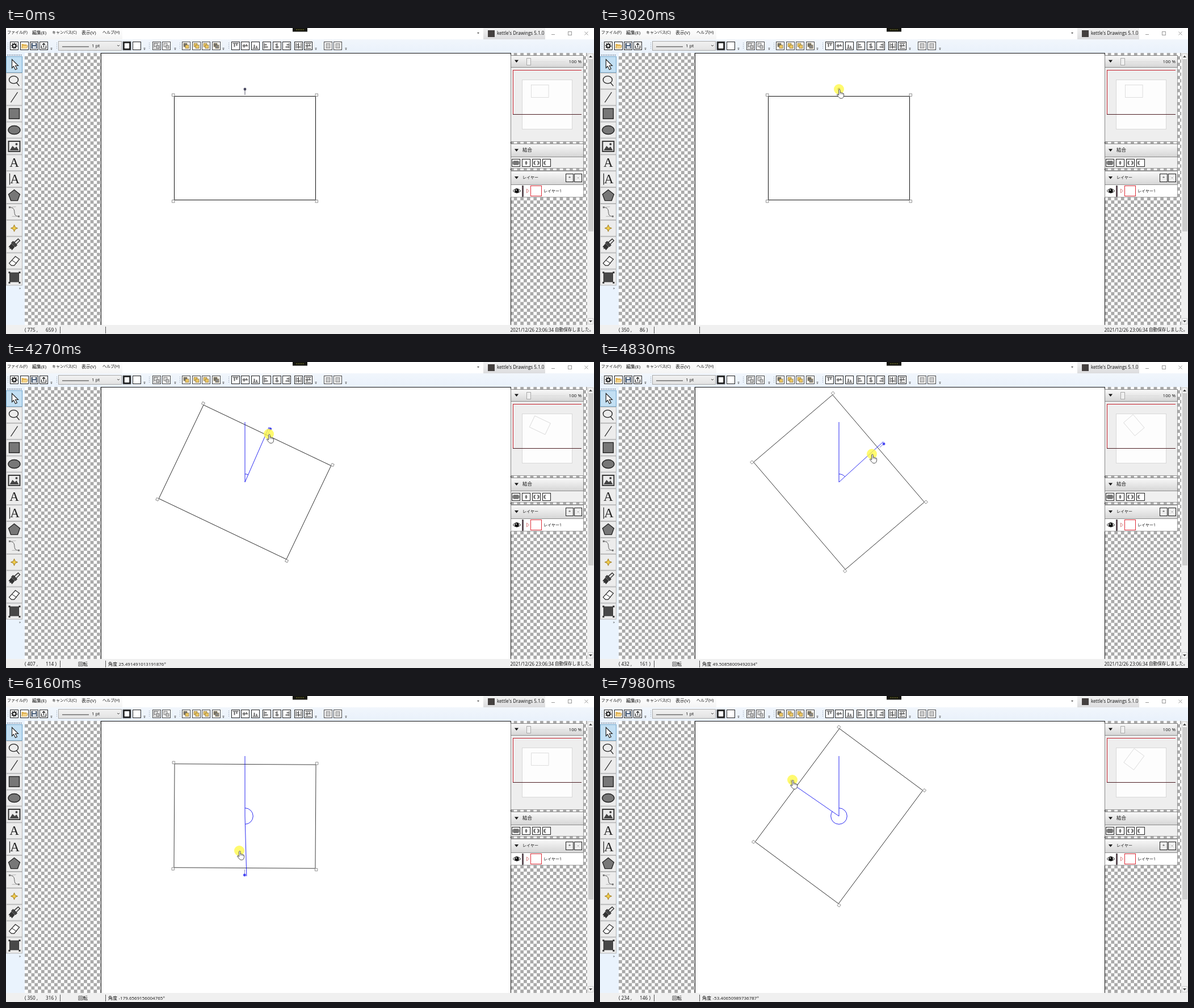
These frames come from a looping animation (1036x540 px, 8000 ms). An HTML page with a canvas:

```html
<!DOCTYPE html>
<html lang="ja">
<head>
<meta charset="utf-8">
<title>Rotate</title>
<style>
html, body { margin: 0; width: 1036px; height: 540px; overflow: hidden; background: #fff; }
canvas { display: block; }
</style>
</head>
<body>
<canvas id="stage" width="1036" height="540"></canvas>
<script>
const W = 1036, H = 540, LOOP = 8000, NOTICE_END = 5040;
const FONT = '"Open Sans", "Noto Sans CJK JP", "Noto Sans CJK", sans-serif';
const stage = document.getElementById('stage').getContext('2d');
const backdrop = document.createElement('canvas');
backdrop.width = W;
backdrop.height = H;
let g = backdrop.getContext('2d');

// Drawing helpers
function fill(x, y, w, h, color) {
  g.fillStyle = color;
  g.fillRect(x, y, w, h);
}
function frame(x, y, w, h, color, width = 1) {
  g.strokeStyle = color;
  g.lineWidth = width;
  g.strokeRect(x, y, w, h);
}
function box(x, y, w, h, color, border, width) {
  fill(x, y, w, h, color);
  frame(x, y, w, h, border, width);
}
function line(x1, y1, x2, y2, color, width = 1) {
  g.strokeStyle = color;
  g.lineWidth = width;
  g.beginPath();
  g.moveTo(x1, y1);
  g.lineTo(x2, y2);
  g.stroke();
}
function shape(d, x, y, color, border, width = 1) {
  const path = new Path2D(d);
  g.save();
  g.translate(x, y);
  if (color) { g.fillStyle = color; g.fill(path); }
  if (border) { g.strokeStyle = border; g.lineWidth = width; g.stroke(path); }
  g.restore();
}
function ellipse(x, y, rx, ry, color, border, width = 1) {
  g.beginPath();
  g.ellipse(x, y, rx, ry, 0, 0, Math.PI * 2);
  if (color) { g.fillStyle = color; g.fill(); }
  if (border) { g.strokeStyle = border; g.lineWidth = width; g.stroke(); }
}
function text(str, x, y, size = 8, color = '#111', align = 'left', family = FONT) {
  g.font = `${size}px ${family}`;
  g.textAlign = align;
  g.textBaseline = 'middle';
  g.fillStyle = color;
  g.fillText(str, x, y);
}
function shade(y, h, top, bottom) {
  const grad = g.createLinearGradient(0, y, 0, y + h);
  grad.addColorStop(0, top);
  grad.addColorStop(1, bottom);
  return grad;
}

function drawCanvasArea() {
  const cell = 5.783;
  fill(33, 44, 991, 480, '#fff');
  g.save();
  g.beginPath();
  g.rect(33, 44, 991, 480);
  g.clip();
  for (let r = 0; r < 84; r++)
    for (let c = (r + 1) % 2; c < 172; c += 2) fill(33 + c * cell, 44 + r * cell, cell, cell, '#a9a9a9');
  box(167.5, 44.5, 722, 500, '#fff', '#111');
  g.restore();
}

function drawTitleBar() {
  fill(0, 0, W, 20, '#fff');
  fill(0, 0, 205, 20, shade(0, 20, '#fff', '#f4f4f4'));
  [['ファイル(F)', 2, 7], ['編集(E)', 46, 8], ['キャンバス(C)', 81, 7], ['表示(V)', 133, 8], ['ヘルプ(H)', 170, 7]]
    .forEach(([label, x, size]) => text(label, x, 8.5, size));
  fill(505, 0, 26, 6.5, '#15150f');
  for (let x = 511; x < 525; x += 3) fill(x, 2.5, 2, 1, '#8a8a35');
  shape('M-2 0H2L0 2Z', 832, 8, '#333');
  fill(841, 0, 109, 20, shade(0, 20, '#f2f2f2', '#dcdcde'));
  fill(849, 4, 12, 12, '#44403f');
  text("kettle's Drawings 5.1.0", 865, 10, 8.05);
  line(961, 11.5, 967, 11.5, '#999');
  frame(990.5, 6.5, 6, 6, '#999');
  shape('M-3-3L3 3M3-3L-3 3', 1022.5, 9.5, null, '#999');
}

function toolBox(x, border = '#222') {
  box(x + .5, 24.5, 14, 14, '#fff', border);
}
function drawToolbar() {
  fill(0, 20, W, 24, shade(20, 24, '#f1f6fc', '#e9f1fb'));
  [3, 89, 252, 306, 392].forEach(x => {
    for (let y = 26; y < 38; y += 3) fill(x, y, 1, 1, '#8794a5');
  });
  [80, 244, 298, 383, 546, 599].forEach(x => {
    fill(x - 1.5, 35, 3, 1, '#555');
    shape('M-1.5 0H1.5L0 2Z', x, 37, '#555');
  });
  [7, 25, 42, 59].forEach(x => toolBox(x));
  ellipse(14.5, 31.5, 3, 3, null, '#222', 2);
  g.setLineDash([1.6, 1.9]);
  ellipse(14.5, 31.5, 4.7, 4.7, null, '#222', 1.6);
  g.setLineDash([]);
  shape('M-5 4V-4H-2L-1-3H4V4Z', 32.5, 32, '#e4b552');
  shape('M-5 4L-3-1H6L4 4Z', 32.5, 32, '#f5d58b', '#b98b2d', .5);
  box(45, 27, 9, 9, '#526782', '#263549');
  fill(47, 27, 5, 3, '#fff');
  fill(47, 32, 6, 4, '#d7dde5');
  shape('M-4-1V4H4V-1M0 2V-5M-2.5-2.5L0-5L2.5-2.5', 66.5, 32, null, '#222', 1.2);

  box(92.5, 23.5, 111, 16, shade(23, 17, '#f2f2f2', '#e2e2e2'), '#aaa');
  line(99, 33, 146, 33, '#333');
  text('1 pt', 151, 32, 8);
  shape('M-2-1L0 1L2-1', 198, 31, null, '#444');
  box(207.5, 25.5, 11, 12, '#fff', '#111', 2.4);
  frame(206, 24, 14, 15, '#333', .7);
  toolBox(223);

  [258, 275].forEach((x, i) => {
    toolBox(x, '#444');
    box(x + 3, 27, 6, 6, '#ddd', '#777');
    box(x + 7, 31, 5, 5, '#ccc', '#777');
    if (!i) { g.setLineDash([1, 1]); frame(x + 2.5, 26.5, 10, 10, '#555'); g.setLineDash([]); }
  });
  [310, 328, 345, 363].forEach((x, i) => {
    toolBox(x, '#444');
    const back = i === 1 || i === 2;
    box(x + 3, 27, 6, 6, back ? '#edc864' : '#777', '#776333', .7);
    box(x + 6, 30, 6, 6, i < 3 ? '#edc864' : '#888', '#776333', .7);
  });
  [397, 414, 432, 452, 470, 487, 508, 525].forEach((x, i) => {
    toolBox(x);
    g.save();
    g.translate(x + 7.5, 31.5);
    if (i >= 3 && i !== 7) g.rotate(-Math.PI / 2);
    const edge = i > 5 ? 0 : (i % 3 - 1) * 4.5;
    line(-5, edge, 5, edge, '#222');
    if (i > 5) { line(-5, -4.5, 5, -4.5, '#222'); line(-5, 4.5, 5, 4.5, '#222'); }
    const top = edge < 0 ? -4 : edge > 0 ? -2 : -3;
    fill(-3, top, 2, 6, '#666');
    fill(1, top + (edge > 0 ? 2 : 0), 2, 4, '#666');
    g.restore();
  });
  [560, 577].forEach(x => {
    toolBox(x, '#444');
    box(x + 4, 27.5, 7, 8, '#ccc', '#888');
  });
}

function drawTools() {
  fill(0, 44, 33, 480, '#eaf3fd');
  for (let x = 2; x < 28; x += 3) fill(x, 47, 1.5, 1.5, '#66758a');
  const at = i => 64.5 + i * 28.88;
  for (let i = 0; i < 14; i++)
    box(.5, at(i) - 14, 28, 28, i ? '#ececec' : '#c2dff3', i ? '#b5b5b5' : '#72a6ca');
  const x = 14.5, ink = '#222', grey = '#777';
  shape('M-4-9V6L-1 3L2 9L5 7.5L2 2H7Z', x, at(0), '#fff', ink, 1.2);
  ellipse(x - 1, at(1) - 2, 8, 6.5, null, ink, 1.4);
  line(x + 4, at(1) + 3, x + 9, at(1) + 9, ink, 1.4);
  line(x - 6, at(2) + 9, x + 6, at(2) - 9, ink, 1.3);
  box(x - 9, at(3) - 9, 18, 18, grey, ink, 1.4);
  ellipse(x, at(4), 10.5, 7.5, grey, ink, 1.4);
  frame(x - 10, at(5) - 9, 20, 18, '#333', 2);
  shape('M-8 7L-3-1L1 3L4 0L8 7Z', x, at(5), '#444');
  ellipse(x + 4, at(5) - 4, 2, 2, '#444');
  const serif = '"Liberation Serif", serif';
  text('A', x, at(6) + 1, 23, ink, 'center', serif);
  text('A', x + 1, at(7) + 1, 23, ink, 'center', serif);
  line(x - 8, at(7) - 10, x - 8, at(7) + 10, ink, 1.2);
  shape('M0-10L10-2L6 9H-6L-10-2Z', x, at(8), grey, ink, 1.3);
  shape('M-8-8C7-7-6 8 8 8', x, at(9), null, '#555');
  shape('M-8-8L3-9M8 8L-4 8', x, at(9), null, '#aaa', .8);
  [[-8, -8], [8, 8]].forEach(([dx, dy]) => frame(x + dx - 1, at(9) + dy - 1, 2, 2, '#555', .8));
  shape('M0-6L1.7-1.7L6 0L1.7 1.7L0 6L-1.7 1.7L-6 0L-1.7-1.7Z', x, at(10), '#f4cf4d', '#9b781d');
  shape('M10-7L7-10L0-4L3 0Z', x, at(11), '#ddd', ink, 1.2);
  shape('M-2-6L5 1L2 4L-5-3Z', x, at(11), '#444', ink);
  shape('M-5-2L1 4L-4 10L-6 7L-8 8L-8 5L-10 4Z', x, at(11), '#333');
  shape('M-9 4L2-8L9-3L0 8H-5Z', x, at(12), '#fff', ink, 1.2);
  line(x - 4, at(12) - 1, x + 4, at(12) + 4, ink);
  box(x - 8, at(13) - 8, 16, 16, '#484848', '#333');
  [-9, 9].forEach(dx => [-9, 9].forEach(dy => fill(x + dx - 1, at(13) + dy - 1, 3, 3, '#333')));
  text('»', 23, 459, 6);
}

function panelHeader(y, h, title) {
  box(889.5, y + .5, 128, h, shade(y, h, '#fafafa', '#d6d6d6'), '#777', .8);
  shape('M-3.5-2H3.5L0 2.5Z', 899.5, y + h / 2, '#111');
  if (title) text(title, 910, y + h / 2 + .5, title.length > 2 ? 7 : 8.5);
}
function drawPanels() {
  box(889.5, 48.5, 128, 152, '#eee', '#888', .8);
  panelHeader(48, 21);
  line(918, 59.5, 986, 59.5, '#ddd');
  box(917.5, 53.5, 7, 12, '#f0f0f0', '#aaa');
  text('100 %', 1014, 59.5, 8, '#111', 'right');
  box(909.5, 91.5, 88, 87, '#fdfdfd', '#d8d8d8');
  line(893, 74.5, 1014, 74.5, '#c4202c');
  line(893.5, 74, 893.5, 153, '#c4202c');
  line(893, 152.5, 1014, 152.5, '#4a1c22');

  box(889.5, 204.5, 128, 43, '#f0f0f0', '#888', .8);
  panelHeader(204, 23, '結合');
  [891, 909, 927, 945].forEach((x, i) => {
    box(x + .5, 231.5, 14, 13, '#fff', '#222');
    const cx = x + 7.5, cy = 238;
    if (i === 0) { ellipse(cx - 2, cy, 4, 4, '#777'); ellipse(cx + 2, cy, 4, 4, '#777'); }
    if (i === 1) shape('M0-4Q4 0 0 4Q-4 0 0-4Z', cx, cy, '#777');
    if (i > 1) shape('M-1-4C-7-4-7 4-1 4Q-4 0-1-4Z', cx, cy, '#777');
    if (i === 2) shape('M1-4C7-4 7 4 1 4Q4 0 1-4Z', cx, cy, '#777');
  });

  box(889.5, 251.5, 128, 47, '#fff', '#888', .8);
  panelHeader(252, 24, 'レイヤー');
  [['+', 986], ['-', 1001]].forEach(([sign, x]) => {
    box(x + .5, 257.5, 13, 14, '#eee', '#222');
    text(sign, x + 7, 264, 8, '#111', 'center');
  });
  shape('M-7 0Q0-8 7 0Q0 7-7 0Z', 900, 287.5, '#fff', '#222');
  ellipse(900, 287.5, 3.8, 3.8, '#111');
  ellipse(899, 286, 1, 1, '#fff');
  box(909.5, 278.5, 2, 19, '#664453', '#333', .7);
  shape('M-2-3.5L2 0L-2 3.5Z', 919.5, 287.5, '#fff', '#c66', .8);
  box(924.5, 278.5, 19, 18, '#fff', '#dd2a35');
  text('レイヤー1', 947, 288, 7);
}

function drawEdges() {
  fill(1024, 44, 12, 480, '#f0f0f0');
  box(1025.5, 45.5, 9, 10, '#f5f5f5', '#ccc');
  shape('M-3 1.5L0-2L3 1.5Z', 1030, 50.5, '#444');
  fill(1026, 56, 9, 303, '#cdcdcd');
  box(1025.5, 512.5, 9, 10, '#f5f5f5', '#ccc');
  shape('M-3-1.5L0 2L3-1.5Z', 1030, 517.5, '#444');
  fill(0, 524, W, 16, '#f0f0f0');
  line(95.5, 527, 95.5, 539, '#555');
  line(175.5, 527, 175.5, 539, '#555');
}

// time, pointer x, y, readout x, y, angle
const keys = [
  [650, 968, 522, 775, 659, 0],
  [930, 735, 378, 780, 463, 0],
  [1430, 494, 166, 452, 169, 0],
  [1780, 440, 128, 377, 117, 0],
  [2190, 421, 114, 350, 95, 0],
  [2800, 421, 113, 350, 93, 0],
  [3020, 421, 108, 350, 86, 0],
  [3790, 449, 116, 389, 100, 16],
  [4280, 463, 127, 407, 114, 25.491491013191876],
  [4630, 474, 145, 424, 139, 38.2],
  [5330, 485, 208, 441, 220, 82.13597520450048],
  [5750, 463, 254, 411, 292, 133],
  [6170, 411, 273, 350, 316, 360 - 179.6569156004765],
  [6590, 383, 283, 301, 331, 205],
  [7010, 341, 267, 245, 307, 360 - 125.22825264797916],
  [7500, 325, 212, 218, 233, 269],
  [7990, 339, 148, 234, 146, 360 - 53.40650989736787]
];

function slope(i, c) {
  const a = keys[Math.max(i - 1, 0)], b = keys[Math.min(i + 1, keys.length - 1)];
  return (b[c] - a[c]) / (b[0] - a[0]);
}
function sample(t, c) {
  const last = keys.length - 1;
  if (t <= keys[0][0]) return keys[0][c];
  if (t >= keys[last][0]) return keys[last][c];
  let i = 0;
  while (keys[i + 1][0] <= t) i++;
  const a = keys[i], b = keys[i + 1], span = b[0] - a[0], u = (t - a[0]) / span, v = 1 - u;
  return a[c] * v * v * (1 + 2 * u) + b[c] * u * u * (3 - 2 * u)
    + span * u * v * (slope(i, c) * v - slope(i + 1, c) * u);
}
function snap(t) {
  if (t < 650) return 0;
  if (t < 3011) return 650 + 70 * Math.floor((t - 650) / 70);
  return 3020 + 70 * Math.floor((t - 3011) / 69.75);
}

const CX = 421, CY = 212, RAD = Math.PI / 180;

function drawShape(angle, dragging) {
  g.save();
  g.translate(940.8, 111.5);
  g.rotate(angle * RAD);
  frame(-15.3, -11, 30.6, 22, '#d0d0d0', .7);
  g.restore();

  g.save();
  g.translate(CX, CY);
  g.rotate(angle * RAD);
  frame(-124.5, -91.5, 249, 183, '#111', dragging ? .8 : 1);
  [-126.2, 126.2].forEach(x => [-93.8, 93.8].forEach(y => box(x - 2.2, y - 2.2, 4.4, 4.4, '#fff', '#777', .8)));
  line(0, -94, 0, -102, dragging ? '#7777c8' : '#444455', .9);
  ellipse(0, -104, 2.4, 2.4, dragging ? '#4646f4' : '#4b4b62');
  g.restore();
}

function drawGuide(angle) {
  const dir = (angle - 90) * RAD, blue = '#1414f0';
  line(CX, CY, CX, CY - 106, blue, .9);
  line(CX, CY, CX + 106 * Math.cos(dir), CY + 106 * Math.sin(dir), blue, .9);
  g.beginPath();
  g.arc(CX, CY, 14.3, -Math.PI / 2, dir);
  g.stroke();
}

function drawPointer(x, y, hand) {
  ellipse(x, y, 9, 9, 'rgba(255,248,70,.78)');
  if (hand) {
    shape('M-1 1Q.2-1 1.5 1V5.5Q3 4.5 4 6Q5.2 5.3 6 6.7Q8 6.5 8 8.5V11Q7.5 15 5 15.7H1.5Q-1 14-4 9.5Q-4 7.5-2.5 8.5L-1 10Z', x + .6, y + .5, '#fff', '#222', .8);
    shape('M1.5 5V8.5M4 6V8.5M6 7V9', x + .6, y + .5, null, '#222', .6);
  } else {
    shape('M0 0V12L2.8 9.5L4.7 13.8L6.6 13L4.8 8.8H8.6Z', x, y, '#fff', '#111', .8);
  }
}

function render(now) {
  const t = snap(now % LOOP), dragging = t > 3020;
  const [x, y, rx, ry, angle] = [1, 2, 3, 4, 5].map(c => sample(t, c));
  const turn = dragging ? angle : 0;
  g.drawImage(backdrop, 0, 0);
  drawShape(turn, dragging);
  if (dragging) {
    drawGuide(Math.max(0, turn - 1.9));
    text('回転', 127, 533.5, 8.5);
    text('角度', 180, 533.5, 8);
    text((turn > 180 ? turn - 360 : turn) + '°', 198.5, 533.5, 8);
  }
  text(`( ${Math.round(rx)} ,`, 33, 533.5, 8.3);
  text(`${Math.round(ry)} )`, 70, 533.5, 8.3);
  if (t < NOTICE_END) {
    text('2021/12/26 23:06:34', 888.5, 533.5, 8.05);
    text('自動保存しました。', 967, 533.5, 7.6);
  }
  if (t >= 650) drawPointer(x, y, t >= 2000);
}

drawCanvasArea();
drawTitleBar();
drawToolbar();
drawTools();
drawPanels();
drawEdges();
g = stage;

let start;
function tick(now) {
  start ??= now;
  render(now - start);
  requestAnimationFrame(tick);
}
render(0);
requestAnimationFrame(tick);
</script>
</body>
</html>
```
